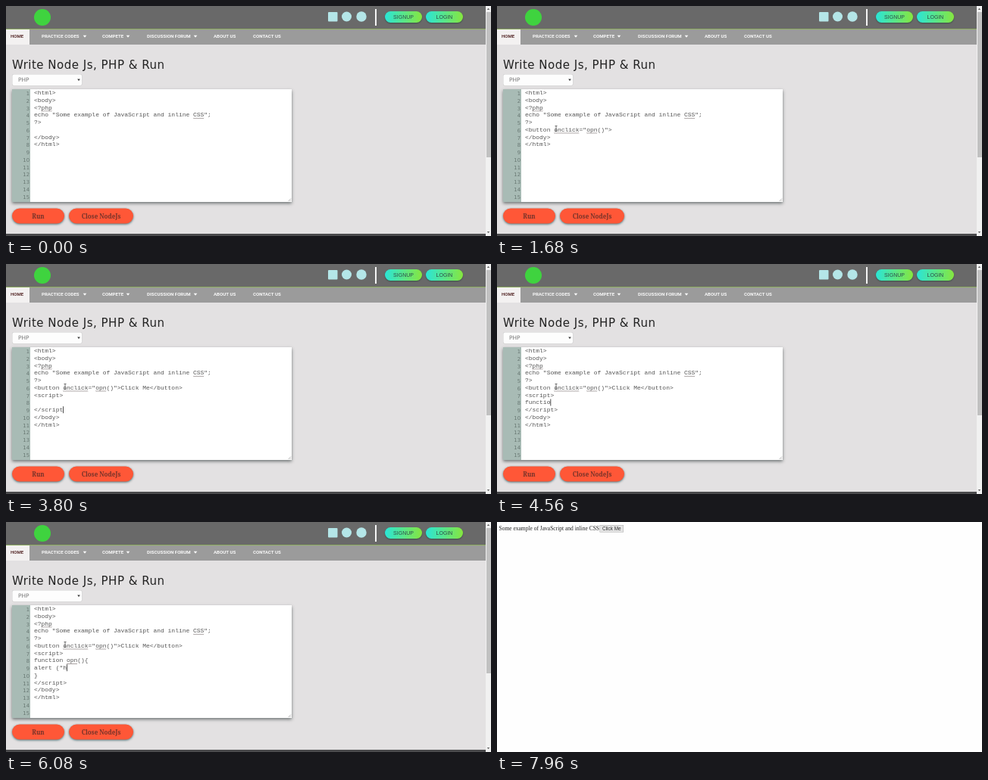
Animation of 640 by 304 pixels, one loop 8000 ms. Source, as an HTML page with a canvas:

```html
<!DOCTYPE html>
<html lang="en">
<head>
<meta charset="utf-8">
<title>Code editor</title>
<style>
html, body { margin: 0; width: 100%; height: 100%; overflow: hidden; background: #e3e1e2; }
canvas { display: block; width: 640px; height: 304px; }
</style>
</head>
<body>
<canvas id="stage"></canvas>
<script>
const LOOP = 8000, W = 640, H = 304;
const OUTPUT_AT = 7200, ALERT_ON = 7520, ALERT_OFF = 7840;
const ROW = 9.75, CODE_X = 37, CODE_Y = 117.2, CODE_SIZE = 7.96;
const CHAR = CODE_SIZE * 0.6;

const MONO = '"Liberation Mono", "Courier New", monospace';
const SANS = '"Liberation Sans", Arial, sans-serif';
const SERIF = '"Liberation Serif", "Times New Roman", serif';
const SLAB = '"Noto Serif", serif';
const WIDE = '"DejaVu Sans", sans-serif';
const MENU = 'Roboto, sans-serif';

const message = 'Some example of JavaScript and inline CSS';
const head = `<html>\n<body>\n<?php\necho "${message}";\n?>\n`;
const tail = '\n</body>\n</html>';
const misspelt = /\b(php|CSS|onclick|opn)\b(?=.)|\bphp$/g;

// Each run types its text between two times, "back" characters before the last caret.
const runs = [
  { from: 160, to: 1540, back: 0, text: '<button onclick="opn()">' },
  { from: 1760, to: 2740, back: 0, text: 'Click Me</button>' },
  { from: 3000, to: 3840, back: 0, text: '\n<script>\n\n<' + '/script>' },
  { from: 4100, to: 5260, back: 10, text: 'function opn(){\n\n}' },
  { from: 5460, to: 6585, back: 2, text: 'alert ("hello");' }
];

const canvas = document.getElementById('stage');
const ctx = canvas.getContext('2d');
const dpr = window.devicePixelRatio || 1;
canvas.width = W * dpr;
canvas.height = H * dpr;

function rect(x, y, w, h, fill) {
  ctx.fillStyle = fill;
  ctx.fillRect(x, y, w, h);
}

function round(x, y, w, h, r, fill) {
  ctx.fillStyle = fill;
  ctx.beginPath();
  ctx.roundRect(x, y, w, h, r);
  ctx.fill();
}

function disc(x, y, r, fill) {
  ctx.fillStyle = fill;
  ctx.beginPath();
  ctx.arc(x, y, r, 0, Math.PI * 2);
  ctx.fill();
}

function poly(points, fill) {
  ctx.fillStyle = fill;
  ctx.beginPath();
  points.forEach(([x, y]) => ctx.lineTo(x, y));
  ctx.closePath();
  ctx.fill();
}

function text(str, x, y, font, fill, align = 'left') {
  ctx.font = font;
  ctx.fillStyle = fill;
  ctx.textAlign = align;
  ctx.fillText(str, x, y);
}

function shadow(color, blur, dy, draw) {
  ctx.save();
  ctx.shadowColor = color;
  ctx.shadowBlur = blur * dpr;
  ctx.shadowOffsetY = dy * dpr;
  draw();
  ctx.restore();
}

function arrow(x, y, w, h, fill) {
  poly([[x - w / 2, y], [x + w / 2, y], [x, y + h]], fill);
}

function drawHeader() {
  rect(0, 0, 633, 30, '#696969');
  disc(48, 15, 11, '#3fd33f');
  round(425, 8, 12.5, 12.5, 1, '#b4e6e8');
  disc(449.5, 14, 6.5, '#b4e6e8');
  disc(469, 14, 6.7, '#b4e6e8');
  rect(487, 4, 2, 22, '#f4f4f4');
  [['SIGNUP', 500], ['LOGIN', 554]].forEach(([label, x]) => {
    const g = ctx.createLinearGradient(x, 0, x + 49, 0);
    g.addColorStop(0, '#2be5d6');
    g.addColorStop(1, '#86e63f');
    shadow('rgba(30,60,50,.6)', 2, 1, () => round(x, 7, 49, 15, 7.5, g));
    text(label, x + 24.5, 17.3, '7px ' + SANS, '#2c4a48', 'center');
  });

  rect(0, 30, 633, 1, '#8fae62');
  rect(0, 31, 633, 20, '#9b9b9b');
  rect(0, 31, 31, 20, '#f3f1f1');
  const font = 'bold 6.1px ' + MENU;
  text('HOME', 6, 42.4, font, '#5b3030');
  [['PRACTICE CODES', 47, 104], ['COMPETE', 127, 161], ['DISCUSSION FORUM', 186, 250],
    ['ABOUT US', 274], ['CONTACT US', 326]].forEach(([label, x, mark]) => {
    text(label, x, 42.4, font, '#fafafa');
    if (mark) arrow(mark, 38.8, 4.6, 3, '#fafafa');
  });
}

function drawScrollbar() {
  rect(633, 0, 7, H, '#f1f1f1');
  poly([[634.8, 5], [638.2, 5], [636.5, 2.8]], '#666');
  rect(634, 8, 6, 192, '#c1c1c1');
  arrow(636.5, 298, 3.4, 2.2, '#666');
}

function drawPage() {
  rect(0, 0, W, H, '#e3e1e2');
  drawHeader();
  ctx.letterSpacing = '0.5px';
  text('Write Node Js, PHP & Run', 8, 83, '15px ' + WIDE, '#222');
  ctx.letterSpacing = '0px';

  round(8, 90, 92.5, 15.5, 2, '#cfcfcf');
  round(8.5, 90.5, 91.5, 14.5, 2, '#fdfdfd');
  text('PHP', 16, 100.4, '7.4px ' + WIDE, '#777');
  arrow(96, 96.5, 3.6, 2.6, '#333');

  shadow('rgba(50,60,60,.65)', 4, 1.5, () => rect(8, 110, 369, 149, '#fff'));
  rect(8, 110, 24, 149, '#a8bbb5');
  for (let i = 0; i < 15; i++) {
    text(i + 1, 31, 118 + i * 9.77, '6.8px ' + WIDE, '#687873', 'right');
  }
  ctx.strokeStyle = '#888';
  ctx.lineWidth = 0.6;
  ctx.beginPath();
  ctx.moveTo(372.5, 258); ctx.lineTo(376, 254.5);
  ctx.moveTo(374.5, 258); ctx.lineTo(376, 256.5);
  ctx.stroke();

  [['Run', 8, 69], ['Close NodeJs', 83, 85]].forEach(([label, x, w]) => {
    shadow('rgba(40,80,85,.8)', 3, 1, () => round(x, 267.5, w, 20, 10, '#ff5737'));
    text(label, x + w / 2, 280.6, 'bold 8px ' + SLAB, '#74332a', 'center');
  });
  rect(0, 301, 633, 3, '#4a4a4c');
  drawScrollbar();
}

function typedState(t) {
  let code = head + tail, pos = head.length, last = 0;
  for (const r of runs) {
    if (t < r.from) break;
    const step = (r.to - r.from) / (r.text.length - 1);
    const n = Math.min(r.text.length, Math.floor((t - r.from) / step + 1e-6) + 1);
    pos -= r.back;
    code = code.slice(0, pos) + r.text.slice(0, n) + code.slice(pos);
    pos += n;
    last = r.from + (n - 1) * step;
  }
  return { code, pos, last };
}

function squiggle(x, y, w) {
  ctx.strokeStyle = '#8d8585';
  ctx.lineWidth = 0.8;
  ctx.beginPath();
  for (let i = 0; i <= w; i++) ctx.lineTo(x + i, y + (i % 2 ? 0.4 : -0.4));
  ctx.stroke();
}

function drawCode(t) {
  const { code, pos, last } = typedState(t);
  code.split('\n').forEach((line, i) => {
    const y = CODE_Y + i * ROW;
    text(line, CODE_X, y, CODE_SIZE + 'px ' + MONO, '#555');
    for (const m of line.matchAll(misspelt)) {
      squiggle(CODE_X + m.index * CHAR, y + 2, m[0].length * CHAR);
    }
  });
  if (t >= runs[0].from && (t - last) % 240 < 120) {
    const before = code.slice(0, pos).split('\n');
    const x = CODE_X + before[before.length - 1].length * CHAR;
    rect(x, CODE_Y + (before.length - 1) * ROW - 7, 0.8, 9, '#222');
  }
}

function drawPointer(t) {
  if (t < 120) return;
  const p = Math.min(1, Math.max(0, (t - 6680) / 360));
  const ease = p * p * (3 - 2 * p);
  const x = 78 - 36 * ease, y = 162 + 116 * ease;
  if (y < 259) {
    rect(x - 0.4, y - 3.5, 0.8, 7, '#444');
    rect(x - 1.5, y - 4, 3, 0.7, '#444');
    rect(x - 1.5, y + 3.3, 3, 0.7, '#444');
  } else {
    poly([[x, y], [x, y + 8], [x + 2, y + 6.3], [x + 3.4, y + 9],
      [x + 4.6, y + 8.4], [x + 3.3, y + 5.8], [x + 5.8, y + 5.8]], '#fff');
    ctx.strokeStyle = '#333';
    ctx.lineWidth = 0.5;
    ctx.stroke();
  }
}

function drawOutput(t) {
  rect(0, 0, W, H, '#fefefe');
  text(message, 2.5, 11.2, '7.5px ' + SERIF, '#222');
  rect(135.5, 4, 31.5, 9.5, '#a9a9a9');
  rect(136, 4.5, 30.5, 8.5, '#e4e4e4');
  text('Click Me', 151.3, 11, '6.4px ' + SANS, '#333', 'center');
  if (t >= ALERT_ON && t < ALERT_OFF) {
    shadow('rgba(0,0,0,.4)', 3, 1, () => rect(215, 0, 210, 58, '#fff'));
    text('hello', 223, 23, '6.4px ' + SANS, '#555');
    round(385, 41, 32, 12, 1, '#4285f4');
    text('OK', 401, 49.3, '6px ' + SANS, '#fff', 'center');
  }
}

function frame(now) {
  const t = now % LOOP;
  ctx.setTransform(dpr, 0, 0, dpr, 0, 0);
  if (t < OUTPUT_AT) {
    drawPage();
    drawCode(t);
    drawPointer(t);
  } else {
    drawOutput(t);
  }
}

let start;
function tick(now) {
  if (start === undefined) start = now;
  frame(Math.max(0, now - start));
  requestAnimationFrame(tick);
}
frame(0);
requestAnimationFrame(tick);
</script>
</body>
</html>
```
